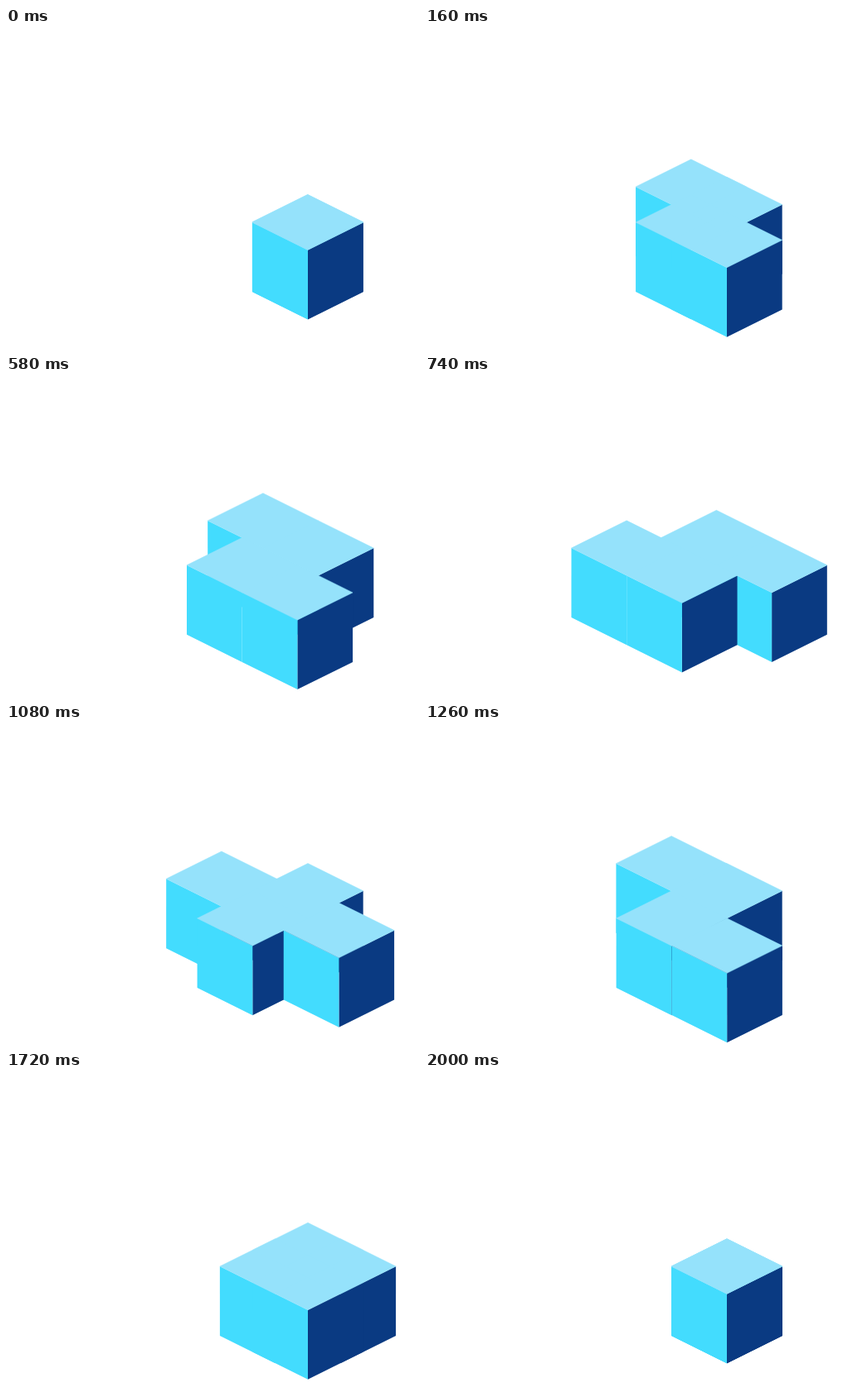
Recreate the animation shown at these times as an HTML page with a canvas. Size 498 by 387 pixels, loop 2.32 s.

```html
<!DOCTYPE html>
<html>
<head>
<meta charset="utf-8">
<style>
html, body { margin: 0; width: 100%; height: 100%; overflow: hidden; background: #fff; }
canvas { display: block; }
</style>
</head>
<body>
<canvas id="stage" width="498" height="387"></canvas>
<script>
const ctx = document.getElementById('stage').getContext('2d');
const LOOP = 2320, END = 2000, STEP = 363, HEIGHT = 84;
const TOP = '#95e2fb', LEFT = '#43dcfe', RIGHT = '#0a3a82';

const out = power => t => 1 - (1 - t) ** power;
const inOut = t => t < .5 ? 2 * t * t : 1 - 2 * (1 - t) ** 2;
const progress = (time, start, end, ease) =>
  ease(Math.min(1, Math.max(0, (time - start) / (end - start))));

// One cube opens into two rows of two, the rows slide past each other,
// the outer cubes change rows, the left pair closes up and all merge again.
function cubesAt(time) {
  const begin = n => END - (4 - n) * STEP;
  const phase = (n, ease) => progress(time, begin(n), begin(n + 1), ease);
  const open = progress(time, 0, begin(0), out(3));
  const slide = phase(0, out(2.2));
  const cross = phase(1, inOut);
  const close = phase(2, out(2.2));
  const size = open - phase(3, out(2));

  const cubes = [];
  for (const row of [-1, 1]) {
    for (const col of [0, 1]) {
      const outer = (row === 1) === (col === 0);
      cubes.push({
        a: size * (col - 1 + row * (.5 - slide) + (1 - col) * close),
        b: size * row * (.5 - (outer ? cross : 0))
      });
    }
  }
  return cubes.sort((c, d) => c.a + c.b - d.a - d.b);
}

const project = (a, b) => [364 + (a - b) * 66.7, 235 + (a + b) * 33.2];

const corners = ({ a, b }) => [
  project(a - .5, b - .5), project(a + .5, b - .5),
  project(a + .5, b + .5), project(a - .5, b + .5)
];

function fill(color, shapes) {
  ctx.fillStyle = color;
  ctx.beginPath();
  for (const points of shapes) {
    points.forEach((p, i) => i ? ctx.lineTo(...p) : ctx.moveTo(...p));
    ctx.closePath();
  }
  ctx.fill();
}

function wall(color, p, q) {
  const down = ([x, y]) => [x, y + HEIGHT];
  fill(color, [[p, q, down(q), down(p)]]);
}

// A wall is hidden when a neighbour in the same line touches or overlaps it
const hidden = (cube, cubes, along, across) => cubes.some(c => {
  const gap = c[along] - cube[along];
  return gap > 1e-6 && gap < 1.001 && Math.abs(c[across] - cube[across]) < .001;
});

function draw(now) {
  const cubes = cubesAt(now % LOOP);
  ctx.fillStyle = '#fff';
  ctx.fillRect(0, 0, 498, 387);
  for (const cube of cubes) {
    const [, right, front, left] = corners(cube);
    if (!hidden(cube, cubes, 'a', 'b')) wall(RIGHT, front, right);
    if (!hidden(cube, cubes, 'b', 'a')) wall(LEFT, left, front);
  }
  // All tops share one plane, so they lie over every wall
  const tops = cubes.map(corners);
  fill(TOP, tops);
  ctx.strokeStyle = TOP;
  ctx.lineWidth = .5;
  ctx.stroke();
}

function tick(now) {
  draw(now);
  requestAnimationFrame(tick);
}
draw(0);
requestAnimationFrame(tick);
</script>
</body>
</html>
```
